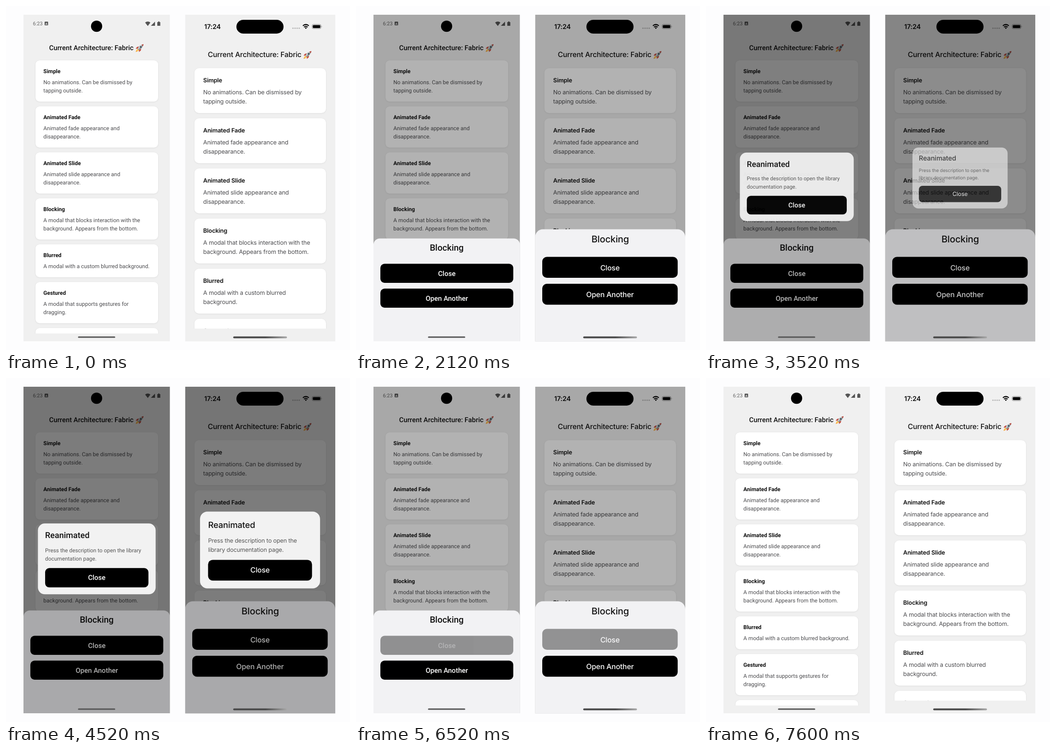
Animation, 748 px wide and 748 px high, one loop 7640 ms. Source, as an HTML page:

```html
<!DOCTYPE html>
<html lang="en">
<head>
<meta charset="utf-8">
<title>Modals</title>
<style>
  html, body { margin: 0; width: 100%; height: 100%; overflow: hidden; background: #fdfdfe; }
  svg { display: block; width: 100%; height: 100%; }
  text { white-space: pre; text-rendering: geometricPrecision; }
  .android { font-family: Roboto, sans-serif; }
  .ios { font-family: Inter, sans-serif; letter-spacing: -.01em; }
  .cards { filter: drop-shadow(0 1px 1.5px rgba(0, 0, 0, .06)); }
  .mid { text-anchor: middle; }
</style>
</head>
<body>
<svg id="stage" viewBox="0 0 748 748">
  <defs>
    <linearGradient id="bar">
      <stop offset=".6" stop-color="#484848"/>
      <stop offset="1" stop-color="#a8a8a8"/>
    </linearGradient>
    <g id="rocket">
      <path d="M4 10 1 15 0 18 3 17 8 14Z" fill="#f5a338"/>
      <path d="M3.5 12 2 16 6 14.5Z" fill="#ffdf70"/>
      <path d="M7 6 3 7 0 11 5 10.5ZM12 11 11 15 7 18 7.500 13Z" fill="#c4473c"/>
      <path d="M4 11Q8 3 17 1 15 10 7 14Z" fill="#8e979c"/>
      <path d="M4 11Q8 3 17 1L5.500 12.500Z" fill="#c3cbce"/>
      <path d="M12.500 2.500Q15 1 17 1 17 3 15.700 5.500Z" fill="#b9493e"/>
      <circle cx="11" cy="7" r="1.900" fill="#42545e"/>
    </g>
  </defs>
</svg>
<script>
const LOOP = 7640;
const DIM = 0.3;

const rect = (x, y, w, h, r, fill, extra = "") =>
  `<rect x="${x}" y="${y}" width="${w}" height="${h}" rx="${r}" fill="${fill}" ${extra}/>`;
const text = (x, y, size, str, fill = "#111", weight = 400, extra = "") =>
  `<text x="${x}" y="${y}" font-size="${size}" font-weight="${weight}" fill="${fill}" ${extra}>${str}</text>`;
const button = (role, x, y, w, h, r, baseline, size, label) =>
  `<g data-role="${role}">${rect(x, y, w, h, r, "#000")}` +
  text(x + w / 2, baseline, size, label, "#fff", 500, 'class="mid"') + "</g>";

const ITEMS = [
  ["Simple", "No animations. Can be dismissed by", "tapping outside."],
  ["Animated Fade", "Animated fade appearance and", "disappearance."],
  ["Animated Slide", "Animated slide appearance and", "disappearance."],
  ["Blocking", "A modal that blocks interaction with the", "background. Appears from the bottom."],
];
const GESTURED = ["Gestured", "A modal that supports gestures for", "dragging."];

const phones = [
  {
    id: "android", x: 38, w: 318.5, bottom: 729,
    heading: { x: 93.7, y: 96, size: 14.85, rocket: [282, 82] },
    card: { x: 64, y: 118, w: 267, gap: 10, r: 9, pad: 17.3, first: 28, second: 52, line: 18, tail: 20, size: 11.95, end: 712 },
    items: [...ITEMS, ["Blurred", "A modal with a custom blurred background."], GESTURED, [""]],
    sheet: { y: 505.5, r: 14, title: 532, size: 19, x: 53, w: 289, h: 41.5, br: 9, tops: [560.5, 614.5], drop: 26, label: 15 },
    modal: { cx: 197.4, cy: 393.3, w: 256, h: 154, r: 15, x: -112.3, title: -45, size: 18, body: 11.85,
      lines: [-14.8, 3.3], wrap: ["Press the description to open the library", "documentation page."],
      by: 20, bh: 42, br: 9, base: 46, label: 15 },
    labelFade: 0.65,
    openPress: [3040, 3230], open: 3235, closePress: [4700, 4960], close: 4870,
    status: text(58.5, 42, 11, "6:23", "#666") + rect(84, 34, 7.5, 8, 1, "#555") +
      text(87.7, 40.5, 6.5, "A", "#eee", 700, 'class="mid"') +
      '<circle cx="197" cy="44" r="12.2"/>' +
      '<path d="M302.500 36Q308.300 31.500 314 36L308.300 43.500ZM324 34V43H315ZM329 35H331V33.500H333.500V35H335.500V43H329Z" fill="#555"/>',
    home: rect(156.5, 718.5, 81, 3, 1.5, "#555"),
  },
  {
    id: "ios", x: 389.5, w: 326.5, bottom: 729.5,
    heading: { x: 438.7, y: 111, size: 15.6, rocket: [647, 97] },
    card: { x: 409.5, y: 135, w: 286.5, gap: 11, r: 10, pad: 19.3, first: 31, second: 57, line: 19.6, tail: 21.4, size: 12.8, end: 701.6 },
    items: [...ITEMS, ["Blurred", "A modal with a custom blurred", "background."], GESTURED],
    sheet: { y: 485.5, r: 17, title: 514, size: 20.1, x: 405, w: 294.5, h: 45.5, br: 10, tops: [545.5, 604], drop: 29, label: 15.8 },
    modal: { cx: 552.4, cy: 374, w: 261, h: 167, r: 16, x: -113, title: -48, size: 18.4, body: 12.7,
      lines: [-16.2, 3.8], wrap: ["Press the description to open the", "library documentation page."],
      by: 21.4, bh: 45, br: 10, base: 49, label: 15.8 },
    labelFade: 0,
    openPress: [3090, 3270], open: 3310, closePress: [4760, 5020], close: 4950,
    status: text(431, 50, 14.4, "17:24", "#111", 600) + rect(501, 30, 102.5, 30, 15, "#000") +
      [624, 628.5, 633, 637.5].map(x => `<circle cx="${x}" cy="48.300" r="1.500" fill="#000" opacity=".25"/>`).join("") +
      '<g fill="none" stroke="#000" stroke-width="2.200"><path d="M645.500 43Q652 37.500 658.500 43M648 46Q652 42.800 656 46"/></g>' +
      '<path d="M649.800 47.500Q652 46 654.200 47.500L652 50Z"/>' +
      rect(665.5, 40, 19.5, 9.5, 3, "none", 'stroke="#000" stroke-opacity=".4"') +
      rect(667, 41.5, 16.5, 6.5, 1.8, "#000") +
      '<path d="M686.200 43.200Q688 44.700 686.200 46.300Z" opacity=".5"/>',
    home: rect(494, 718.5, 117, 4, 2, "url(#bar)"),
  },
];

function cards({ card: c, items }) {
  let y = c.y;
  return items.map(([title, ...lines]) => {
    const h = c.second + (lines.length - 1) * c.line + c.tail;
    const x = c.x + c.pad;
    const out = rect(c.x, y, c.w, h, c.r, "#fff", 'stroke="#000" stroke-opacity=".035"') +
      text(x, y + c.first, c.size, title, "#111", 600) +
      lines.map((s, i) => text(x, y + c.second + i * c.line, c.size, s, "#4c4c4f")).join("");
    y += h + c.gap;
    return out;
  }).join("");
}

function build(p) {
  const { heading: h, sheet: s, modal: m } = p;
  const height = p.bottom - 19;
  const mid = p.x + p.w / 2;
  const shade = role => rect(p.x, 19, p.w, height, 0, "#000", `data-role="${role}" opacity="0"`);
  return `<g class="${p.id}" id="${p.id}">
    <clipPath id="${p.id}-screen">${rect(p.x, 19, p.w, height, 0, "#000")}</clipPath>
    <clipPath id="${p.id}-list">${rect(p.x, 19, p.w, p.card.end - 19, 0, "#000")}</clipPath>
    <g clip-path="url(#${p.id}-screen)">
      ${rect(p.x, 19, p.w, height, 0, "#f0f0f0")}
      ${p.status}
      ${text(h.x, h.y, h.size, "Current Architecture: Fabric", "#111", 500)}
      <use href="#rocket" x="${h.rocket[0]}" y="${h.rocket[1]}"/>
      <g clip-path="url(#${p.id}-list)"><g class="cards">${cards(p)}</g></g>
      ${shade("shade1")}
      <g data-role="sheet">
        ${rect(p.x, s.y, p.w, 300, s.r, "#f2f2f4")}
        ${text(mid, s.title, s.size, "Blocking", "#111", 500, 'class="mid"')}
        ${["Close", "Open Another"].map((label, i) =>
          button(i ? "another" : "done", s.x, s.tops[i], s.w, s.h, s.br, s.tops[i] + s.drop, s.label, label)).join("")}
      </g>
      ${shade("shade2")}
      <g data-role="modal">
        ${rect(-m.w / 2, -m.h / 2, m.w, m.h, m.r, "#f2f2f2")}
        ${text(m.x, m.title, m.size, "Reanimated", "#111", 500)}
        ${m.wrap.map((line, i) => text(m.x, m.lines[i], m.body, line, "#555")).join("")}
        ${button("dismiss", m.x, m.by, -2 * m.x, m.bh, m.br, m.base, m.label, "Close")}
      </g>
    </g>
    ${p.home}
  </g>`;
}

const stage = document.getElementById("stage");
stage.insertAdjacentHTML("beforeend", phones.map(build).join(""));
for (const p of phones) {
  p.el = {};
  for (const node of document.querySelectorAll(`#${p.id} [data-role]`)) p.el[node.dataset.role] = node;
}

const ramp = (t, start, length) => Math.min(1, Math.max(0, (t - start) / length));
const ease = k => k < 0.5 ? 2 * k * k : 1 - 2 * (1 - k) ** 2;

function press(node, t, [down, up], labelFade) {
  const k = ramp(t, down, 150) * (1 - ramp(t, up, 250));
  node.setAttribute("opacity", 1 - 0.6 * k);
  node.lastChild.setAttribute("opacity", 1 - labelFade * k);
}

function draw(t) {
  for (const p of phones) {
    const { el, modal: m } = p;
    const dim = ramp(t, 1345, 300) - ramp(t, 6600, 300);
    const slide = ease(ramp(t, 1400, 320)) - ease(ramp(t, 6600, 320));
    const pop = ramp(t, p.open, 300) - ramp(t, p.close, 300);

    el.shade1.setAttribute("opacity", DIM * dim);
    el.sheet.setAttribute("transform", `translate(0 ${(1 - slide) * (p.bottom - p.sheet.y)})`);
    el.shade2.setAttribute("opacity", DIM * pop);
    el.modal.setAttribute("opacity", pop ** 1.4);
    el.modal.setAttribute("transform", `translate(${m.cx} ${m.cy}) scale(${0.3 + 0.7 * pop})`);

    press(el.another, t, p.openPress, p.labelFade);
    press(el.dismiss, t, p.closePress, p.labelFade);
    press(el.done, t, [6340, 6610], p.labelFade);
  }
}

function tick() {
  draw(performance.now() % LOOP);
  requestAnimationFrame(tick);
}
tick();
</script>
</body>
</html>
```
